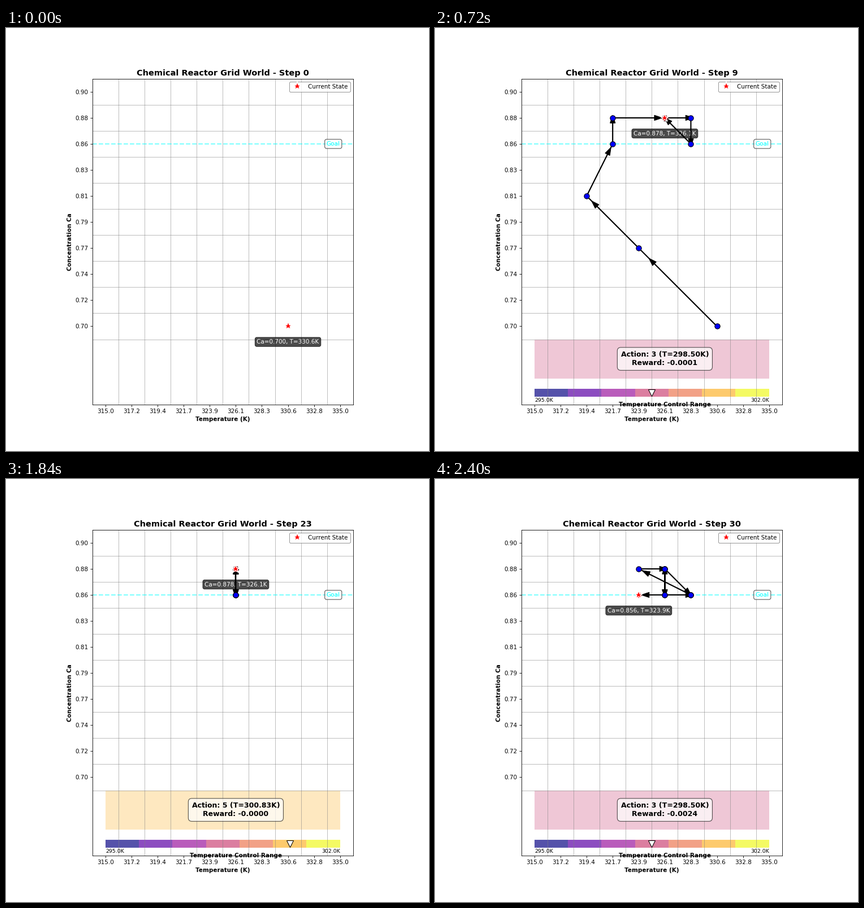
A matplotlib script for the animation above (2480 ms loop, 748 px wide and 748 px high).

```python
import numpy as np
import matplotlib.pyplot as plt
from matplotlib.animation import FuncAnimation
from matplotlib.patches import Rectangle

INCHES, DPI = 10, 74.8
CELLS, ACTIONS, TRAIL = 10, 7, 10
STEPS = 31

# Visited cells as (temperature index, concentration index)
LOW, HIGH = (5, 7), (5, 8)
PATH = [(7, 0), (4, 3), (2, 5), (3, 7), (3, 8), HIGH, (6, 8), (6, 7), HIGH,
        HIGH, HIGH, LOW, HIGH, LOW, HIGH, LOW, HIGH, LOW, HIGH, HIGH,
        LOW, HIGH, LOW, HIGH, LOW, (6, 7), (4, 8), HIGH, (6, 7), (6, 7), (4, 7)]
CHOICES = [0, 0, 3, 6, 4, 6, 5, 2, 2, 3, 5, 3, 5, 3, 5, 3,
           5, 3, 5, 5, 3, 5, 3, 5, 3, 4, 2, 6, 4, 4, 3]
COSTS = [0, .9417, .2904, .0863, .0214, .0175, .0092, .0031, .0012, .0001,
         .0008, .0016, .0028, .0016, .0028, .0016, .0028, .0016, .0028, .0004,
         .0011, .0003, .0006, .0000, .0016, .0047, .0120, .0182, .0065, .0038, .0024]

temps = np.linspace(315, 335, CELLS)
concs = np.linspace(0.7, 0.9, CELLS)
controls = np.linspace(295, 302, ACTIONS)
colors = plt.cm.plasma(np.linspace(0, 1, ACTIONS))
bar_step = (CELLS - 1) / ACTIONS

plt.rcParams["font.family"] = "DejaVu Sans"
fig, ax = plt.subplots(figsize=(INCHES, INCHES), dpi=DPI)
ax.set_xlim(-0.5, 9.5)
ax.set_ylim(-3, 9.5)
ax.set_aspect("equal")
ax.set_xticks(range(CELLS), [f"{t:.1f}" for t in temps])
ax.set_yticks(range(CELLS), [f"{c:.2f}" for c in concs])
edges = np.arange(-0.5, CELLS)
ax.set_xticks(edges, minor=True)
ax.set_yticks(edges, minor=True)
ax.grid(which="minor", color="gray", linestyle="-", linewidth=0.5)
ax.tick_params(which="minor", length=0)
ax.set_xlabel("Temperature (K)", fontweight="bold")
ax.set_ylabel("Concentration Ca", fontweight="bold")
title = ax.set_title("", fontsize=14, fontweight="bold")


def boxed(pad, face):
    return dict(boxstyle=f"round,pad={pad}", facecolor=face, alpha=0.7)


ax.axhline(7, color="cyan", linestyle="--", linewidth=2, alpha=0.5)
ax.text(9, 7, "Goal", color="cyan", ha="right", va="center",
        bbox=boxed(0.3, "white"))
star, = ax.plot([], [], "r*", markersize=15, markeredgecolor="white",
                markeredgewidth=1.5, linestyle="none",
                label="Current State", zorder=7)
ax.legend(loc="upper right", edgecolor="gray")

moving = []


def draw_trail(points):
    xs, ys = zip(*points)
    moving.extend(ax.plot(xs, ys, "k-", linewidth=2, zorder=4))
    for (x0, y0), (x1, y1) in zip(points, points[1:]):
        if (x0, y0) != (x1, y1):
            moving.append(ax.arrow(x0, y0, 0.8 * (x1 - x0), 0.8 * (y1 - y0),
                                   head_width=0.2, head_length=0.3,
                                   fc="black", ec="black", zorder=4))
    moving.extend(ax.plot(xs[:-1], ys[:-1], "bo", markersize=9,
                          markeredgecolor="black", zorder=5))
    moving.extend(ax.plot(xs[-1], ys[-1], "ro", markersize=8, zorder=6))


def draw_panel(action, cost):
    moving.append(ax.add_patch(Rectangle((0, -2), 9, 1.5, color=colors[action],
                                         alpha=0.3, linewidth=0)))
    for i, color in enumerate(colors):
        moving.append(ax.add_patch(Rectangle((i * bar_step, -2.7), bar_step, 0.3,
                                             color=color, alpha=0.7, linewidth=0)))
    moving.extend(ax.plot((action + 0.5) * bar_step, -2.55, "wv", markersize=12,
                          markeredgecolor="black", zorder=5))
    message = f"Action: {action} (T={controls[action]:.2f}K)\nReward: -{cost:.4f}"
    moving.append(ax.text(5, -1.25, message, fontsize=12, fontweight="bold",
                          ha="center", va="center", bbox=boxed(0.5, "white")))
    for x, value, side in ((0, controls[0], "left"), (9, controls[-1], "right")):
        moving.append(ax.text(x, -2.75, f"{value:.1f}K", fontsize=9,
                              ha=side, va="top"))
    moving.append(ax.text(5, -3, "Temperature Control Range", fontweight="bold",
                          ha="center", va="center"))


def update(step):
    while moving:
        moving.pop().remove()
    x, y = PATH[step]
    title.set_text(f"Chemical Reactor Grid World - Step {step}")
    star.set_data([x], [y])
    moving.append(ax.text(x, y - 0.6, f"Ca={concs[y]:.3f}, T={temps[x]:.1f}K",
                          color="white", ha="center", va="center",
                          bbox=boxed(0.3, "black")))
    if step:
        draw_trail(PATH[max(0, step - TRAIL + 1):step + 1])
        draw_panel(CHOICES[step], COSTS[step])
    return [title, star, *moving]


anim = FuncAnimation(fig, update, frames=STEPS, interval=80,
                     repeat=True, repeat_delay=0, blit=False)
plt.show()
```
